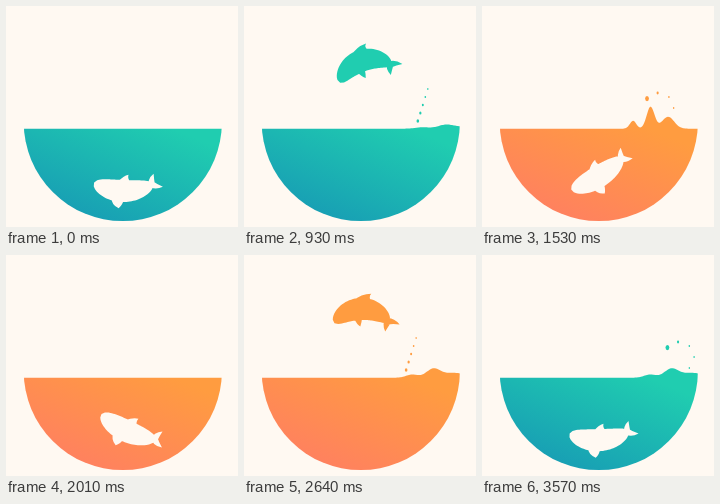
Write an HTML page with a canvas that moves like this. It is 232 px wide and 221 px high and loops after 3600 ms.

```html
<!DOCTYPE html>
<html lang="en">
<head>
<meta charset="utf-8">
<title>Dolphin bowl</title>
<style>
html, body { margin: 0; width: 100%; height: 100%; overflow: hidden; background: #fff9f2; }
canvas { display: block; width: 232px; height: 221px; }
</style>
</head>
<body>
<canvas id="stage"></canvas>
<script>
const W = 232, H = 221, LOOP = 3600, HALF = LOOP / 2, LEVEL = 122.7;
const PAPER = '#fff9f2';
const { sin, cos, exp, PI, min, max } = Math;
const RAD = PI / 180;
const canvas = document.getElementById('stage');
const ctx = canvas.getContext('2d');
const dpr = window.devicePixelRatio || 1;
canvas.width = W * dpr;
canvas.height = H * dpr;

const clamp = v => max(0, min(1, v));
const smooth = v => v * v * (3 - 2 * v);
const bump = (t, mid, width) => exp(-(((t - mid) / width) ** 2));

function gradient(low, high) {
  const g = ctx.createLinearGradient(88, 214, 132, 108);
  g.addColorStop(0, low);
  g.addColorStop(1, high);
  return g;
}
const teal = gradient('#189fb4', '#20cdb0');
const orange = gradient('#ff815f', '#ff9c40');

// One dive and leap; the top of the leap is at 895 ms
function poseAt(t) {
  const depth = (1 - cos((t - 895) / HALF * 2 * PI)) / 2;
  const turn = (t + 20) / HALF * 2 * PI;
  return {
    x: 120 + 31 * bump(t, 470, 170) - 6 * bump(t, 1320, 160),
    y: 54 + 131 * smooth(depth) ** 1.2,
    pitch: -4 + 46 * sin(turn) - 6 * sin(2 * turn),
    bend: 1.8 - 2.8 * depth
  };
}

// The body is a tapered band along a bent spine, nose at the left
function dolphinPath({ x, y, pitch, bend }) {
  const place = (s, v) => {
    const mid = (pitch + bend * s / 2) * RAD, end = (pitch + bend * s) * RAD;
    return [x + s * cos(mid) - v * sin(end), y + s * sin(mid) + v * cos(end)];
  };
  const path = new Path2D();
  const NOSE = -33, LENGTH = 60, STEPS = 40;
  for (let i = 0; i <= 2 * STEPS; i++) {
    const u = 1 - Math.abs(1 - i / STEPS);
    const half = 22 * u ** .5 * (1 - u) ** .6 + 1.5 * u;
    path.lineTo(...place(NOSE + LENGTH * u, i < STEPS ? -half : half));
  }
  path.closePath();

  // Fins run clockwise like the body: base, tip, base
  const fin = (from, lead, tip, trail, to) => {
    path.moveTo(...place(...from));
    path.quadraticCurveTo(...place(...lead), ...place(...tip));
    path.quadraticCurveTo(...place(...trail), ...place(...to));
    path.closePath();
  };
  fin([-9, -9], [-3, -15], [4, -16], [2, -12], [6, -8]);
  fin([-2, 8], [-3, 14], [-6, 17.5], [-12, 15], [-13, 8]);
  fin([22, 2], [25, -7], [34, -8], [31, -3], [29, 2]);
  fin([29, -2], [31, 3], [34, 8], [25, 7], [22, -2]);
  return path;
}

// Place and size of drop i, 390 ms after each kind of splash
const leapDrop = i => ({ x: 162 + 2.5 * i, y: 115 - 8 * i, r: 1.3 - .16 * i, speed: .13 });
const diveDrop = i => {
  const a = (47 - 47 * i) * RAD;
  return { x: 197 + 15 * cos(a), y: 102 + 15 * sin(a), r: .7 + 1.2 * (i / 4) ** 4, speed: .085 };
};
const splashes = [0, HALF].flatMap(t => [
  { born: t + 450, drop: leapDrop },
  { born: t + 1380, drop: diveDrop }
]);

// Three humps spread out and drift right at a growing speed
function surface(x, t) {
  let y = LEVEL;
  for (const { born } of splashes) {
    const age = t - born;
    if (age < 0 || age > 550) continue;
    const size = clamp(age / 120) * clamp(1 - (age - 150) / 400);
    const spread = 1 + max(0, age - 150) / 300;
    for (let i = 0; i < 3; i++) {
      const mid = 151 + 17.5 * i + (1.3e-4 + 3e-5 * i) * (age * age - 22500);
      y -= (8 + 12 * sin(i * PI / 2) + 2 * i) * size * bump(x, mid, (4.5 + i * i) * spread);
    }
  }
  return y;
}

function waterPath(t) {
  const path = new Path2D();
  path.moveTo(0, H);
  for (let x = 0; x <= W; x++) path.lineTo(x, surface(x, t));
  path.lineTo(W, H);
  path.closePath();
  return path;
}

const bowl = new Path2D();
bowl.arc(116.8, 116, 99.1, 0, PI * 2);

function drawDrops(t) {
  for (const { born, drop } of splashes) {
    const age = t - born;
    if (age < 40 || age > 600) continue;
    const shrink = clamp((600 - age) / 90), rise = clamp(age / 130);
    for (let i = 0; i < 5; i++) {
      const { x, y, r, speed } = drop(i);
      ctx.beginPath();
      ctx.ellipse(x + speed * (age - 390), LEVEL + (y - LEVEL) * rise,
                  r * shrink, r * 1.35 * shrink, 0, 0, PI * 2);
      ctx.fill();
    }
  }
}

function fillInside(clip, shape) {
  ctx.save();
  ctx.clip(clip);
  ctx.fill(shape);
  ctx.restore();
}

const air = new Path2D(), below = new Path2D();
air.rect(0, 0, W, LEVEL);
below.rect(0, LEVEL, W, H);

function drawColoured(fill, alpha, water, dolphin, t) {
  ctx.globalAlpha = alpha;
  ctx.fillStyle = fill;
  fillInside(bowl, water);
  fillInside(air, dolphin);
  drawDrops(t);
}

function draw(t) {
  const phase = t % HALF;
  const dolphin = dolphinPath(poseAt(phase));
  const water = waterPath(t);
  const warm = clamp((t - 1455) / 60) - clamp((t - 1455 - HALF) / 60);

  ctx.setTransform(dpr, 0, 0, dpr, 0, 0);
  ctx.globalAlpha = 1;
  ctx.fillStyle = PAPER;
  ctx.fillRect(0, 0, W, H);
  if (warm < 1) drawColoured(teal, 1, water, dolphin, t);
  if (warm > 0) drawColoured(orange, warm, water, dolphin, t);

  // Below the surface the dolphin is cut out of the water
  ctx.globalAlpha = phase < 895 ? 1 : clamp((phase - 1340) / 80);
  ctx.fillStyle = PAPER;
  fillInside(below, dolphin);
}

const start = performance.now();
function tick() {
  draw((performance.now() - start) % LOOP);
  requestAnimationFrame(tick);
}
tick();
</script>
</body>
</html>
```
